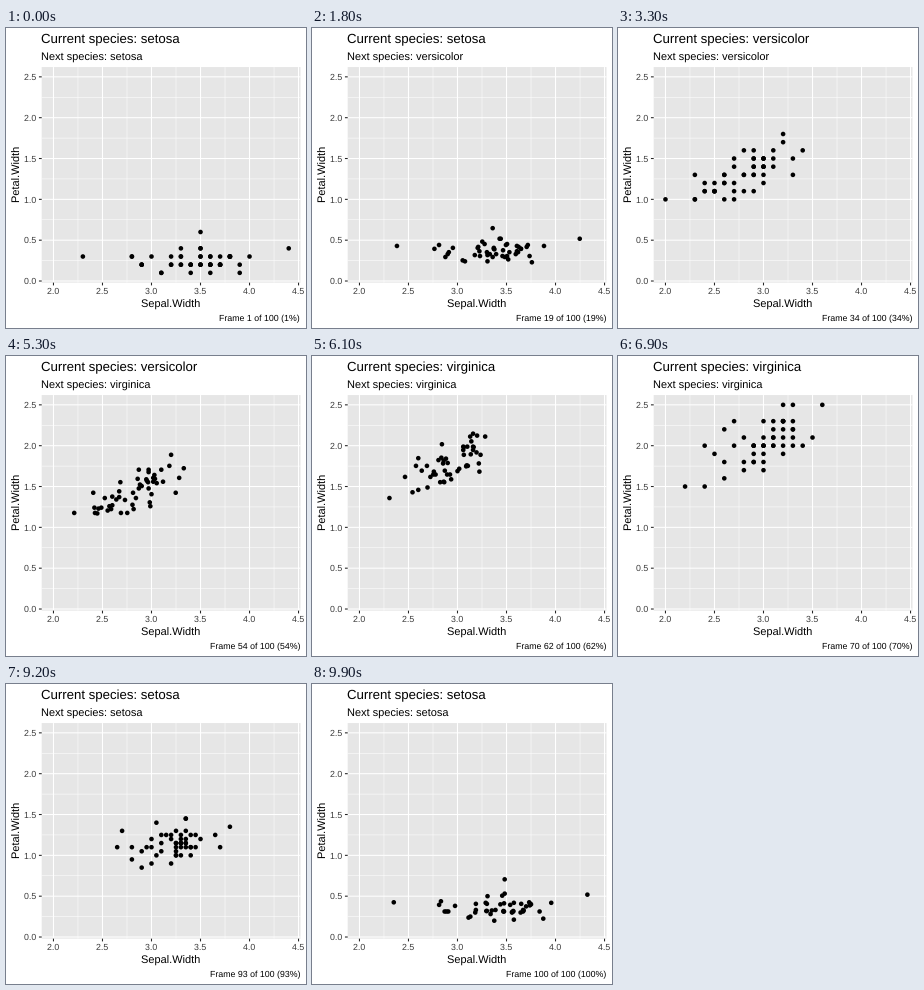
Recreate the animation shown at these times as a matplotlib script. Size 300 px wide and 300 px high, loop 10000 ms.

```python
import math

import numpy as np
import matplotlib.pyplot as plt
from matplotlib.animation import FuncAnimation
from matplotlib.patches import PathPatch, Rectangle
from matplotlib.textpath import TextPath
from matplotlib.transforms import Affine2D

SIZE, DPI, FRAMES = 300, 72, 100
HOLD = 17               # frames each species rests
MOVES = [17, 17, 16]    # frames of each transition
NAMES = ["setosa", "versicolor", "virginica"]

# Panel edges in pixels, y pointing down.
LEFT, RIGHT, TOP, BOTTOM = 35.7, 294.5, 39.05, 254.65
TICK = 2.75

# Outlying flowers: (sepal width, petal width) in each state.
KEYS = [
    [(4.4, 0.4), (3.1, 1.4), (3.2, 2.3)],
    [(2.3, 0.3), (3.0, 1.4), (3.1, 2.3)],
    [(3.5, 0.6), (2.3, 1.0), (3.2, 2.3)],
    [(3.7, 0.2), (2.0, 1.0), (3.2, 2.0)],
    [(3.4, 0.2), (3.2, 1.8), (3.2, 2.3)],
    [(3.8, 0.3), (2.5, 1.1), (2.2, 1.5)],
    [(3.1, 0.1), (2.7, 1.4), (3.6, 2.5)],
    [(3.2, 0.2), (3.4, 1.6), (3.0, 2.3)],
]
COUNT = 50

plt.rcParams.update({"font.family": "Liberation Sans", "toolbar": "None"})
rng = np.random.default_rng(16)


def flowers(state, means, sds, corr):
    """Key flowers plus a correlated cloud, measured to 0.1."""
    u, v = rng.standard_normal((2, COUNT - len(KEYS))).clip(-1.9, 1.9)
    v = corr * u + math.sqrt(1 - corr ** 2) * v
    cloud = np.column_stack([u, v.clip(-1.9, 1.9)]) * sds + means
    return np.vstack([[k[state] for k in KEYS], cloud.round(1)])


STATES = [
    flowers(0, (3.42, 0.23), (0.33, 0.075), 0.23),
    flowers(1, (2.78, 1.32), (0.27, 0.18), 0.66),
    flowers(2, (2.95, 2.00), (0.27, 0.25), 0.54),
]


def px(x):
    return LEFT + (x - 1.88) / 2.64 * (RIGHT - LEFT)


def py(y):
    return BOTTOM - (y + 0.02) / 2.64 * (BOTTOM - TOP)


def state_at(n):
    """Species before and after, and progress, for 1-based frame n."""
    for i, move in enumerate(MOVES):
        if n <= HOLD:
            return i, i, 0.0
        if n <= HOLD + move:
            return i, (i + 1) % 3, (n - HOLD) / move
        n -= HOLD + move


fig = plt.figure(figsize=(SIZE / DPI, SIZE / DPI), dpi=DPI, facecolor="white")
ax = fig.add_axes([0, 0, 1, 1])
ax.set(xlim=(0, SIZE), ylim=(SIZE, 0))
ax.axis("off")


class Label:
    """Outline text on a whole-pixel origin; align 0 left, 0.5 mid, 1 right."""

    def __init__(self, x, y, size, align=0, text="", color="black", angle=0):
        self.x, self.y, self.size = x, y, size
        self.align, self.angle = align, angle
        self.patch = PathPatch(TextPath((0, 0), "x", size=size), fc=color,
                               lw=0, snap=False, zorder=4)
        ax.add_patch(self.patch)
        if text:
            self.write(text)

    def write(self, text):
        path = TextPath((0, 0), text, size=self.size)
        bearing = 0.05 * self.size
        shift = -self.align * (path.get_extents().x1 + bearing)
        turn = math.radians(self.angle)
        x = math.floor(self.x + shift * math.cos(turn))
        y = round(self.y - shift * math.sin(turn))
        place = Affine2D().rotate(turn).scale(1, -1).translate(x, y)
        self.patch.set_path(place.transform_path(path))


def grid(xs, ys, width):
    style = dict(colors="white", linewidth=width, snap=False)
    ax.vlines(px(xs), TOP, BOTTOM, **style)
    ax.hlines(py(ys), LEFT, RIGHT, **style)


ax.add_patch(Rectangle((LEFT, TOP), RIGHT - LEFT, BOTTOM - TOP,
                       fc="#e6e6e6", lw=0, snap=False))
x_ticks, y_ticks = np.arange(2, 4.6, 0.5), np.arange(0, 2.6, 0.5)
grid(x_ticks[:-1] + 0.25, y_ticks[:-1] + 0.25, 0.53)
grid(x_ticks, y_ticks, 1.07)

tick = dict(colors="#262626", linewidth=1.07, snap=False)
ax.vlines(px(x_ticks), BOTTOM, BOTTOM + TICK, **tick)
ax.hlines(py(y_ticks), LEFT - TICK, LEFT, **tick)
for v in x_ticks:
    Label(px(v), 266, 8.8, 0.5, f"{v:.1f}", "#3c3c3c")
for v in y_ticks:
    Label(LEFT - 4.95, py(v) + 3.16, 8.8, 1, f"{v:.1f}", "#3c3c3c")

Label((LEFT + RIGHT) / 2, 279, 11, 0.5, "Sepal.Width")
Label(14, (TOP + BOTTOM) / 2, 11, 0.5, "Petal.Width", angle=90)

title = Label(LEFT, 15, 13.2)
subtitle = Label(LEFT, 32, 11)
caption = Label(RIGHT, 293, 8.8, 1)
# One colour per dot keeps sub-pixel placement.
dots = ax.scatter(np.zeros(COUNT), np.zeros(COUNT), s=4.6 ** 2,
                  c=["black"] * COUNT, linewidths=0, zorder=3)


def update(k):
    n = k + 1
    a, b, t = state_at(n)
    x, y = (STATES[a] + (STATES[b] - STATES[a]) * t).T
    dots.set_offsets(np.column_stack([px(x), py(y)]))
    title.write(f"Current species: {NAMES[b if t >= 0.5 else a]}")
    subtitle.write(f"Next species: {NAMES[b]}")
    caption.write(f"Frame {n} of {FRAMES} ({100 * n // FRAMES}%)")


anim = FuncAnimation(fig, update, frames=FRAMES, interval=100,
                     repeat=True, repeat_delay=0, blit=False)
plt.show()
```
